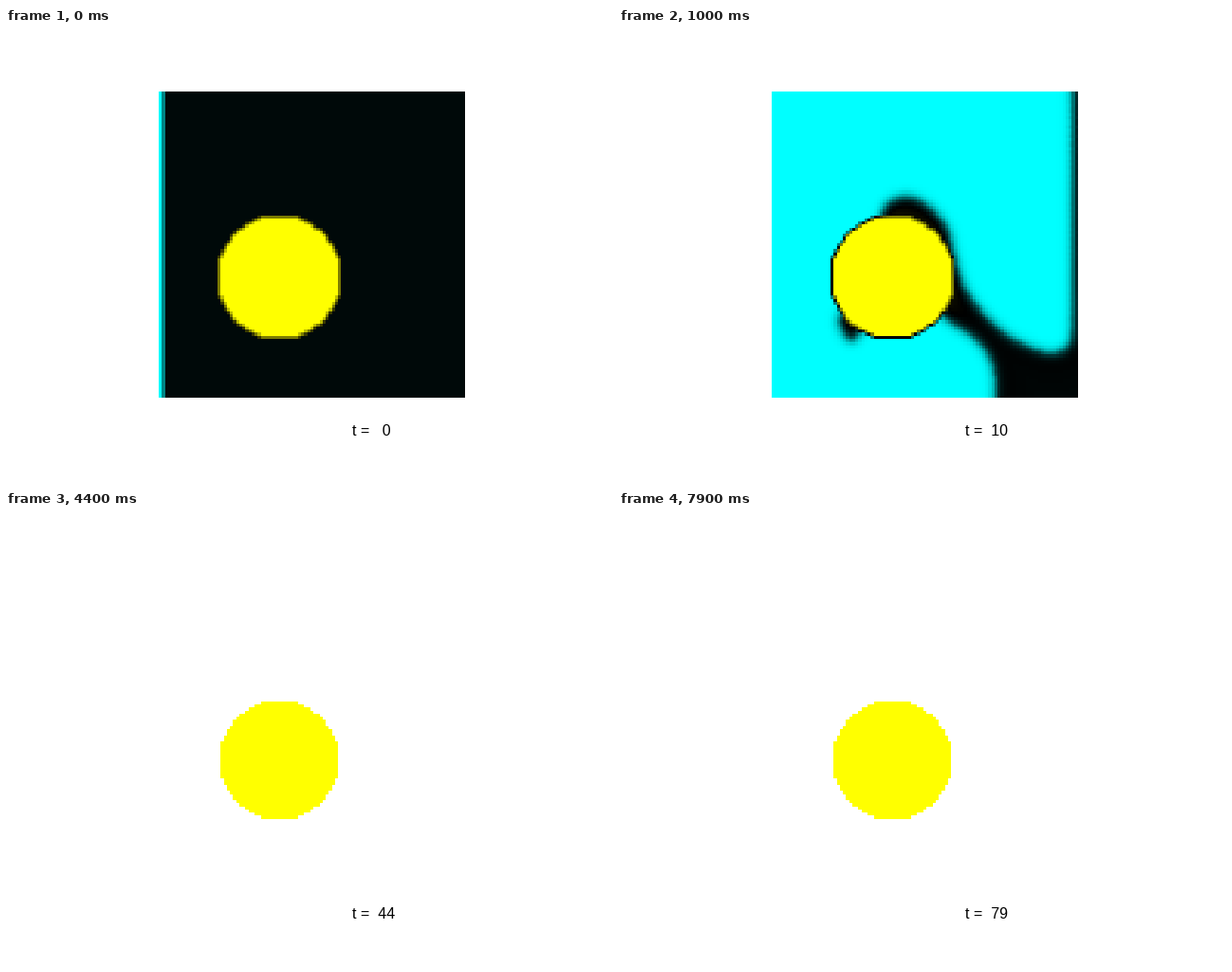
Write a matplotlib script that moves like this. It is 640 by 480 pixels and loops after 8 s.

```python
import numpy as np
import matplotlib.pyplot as plt
from matplotlib.animation import FuncAnimation
from matplotlib.colors import LinearSegmentedColormap
from matplotlib.path import Path

W, H, DPI = 640, 480, 100
LEFT, RIGHT, TOP, BOTTOM = 161, 484, 67, 390
N = 100
FRAMES, STEP = 80, 100
BLOWUP = 13          # from here on the field is undefined

# Grid nodes in stage pixels, row 0 at the bottom.
ix, iy = np.meshgrid(np.arange(N), np.arange(N))
cell = (RIGHT - LEFT) / (N - 1)
nodes = np.column_stack([(LEFT + ix * cell).ravel(),
                         (BOTTOM - iy * cell).ravel()])
disc_r = np.hypot(ix - 39, iy - 39)
solid = disc_r < 20
centre = np.array([LEFT + 39 * cell, BOTTOM - 39 * cell])

# Interface between the two fluids, from the top wall to the bottom wall.
y = np.linspace(40, 410, 27)
start = np.column_stack([np.full_like(y, 166), y])
early = np.column_stack([218 + 40 * np.exp(-((y - 146) / 62) ** 2)
                         + 14 * np.exp(-((y - 385) / 45) ** 2), y])
middle = np.array([
    (380, 40), (386, 68), (400, 90), (427, 108), (448, 130), (454, 158),
    (446, 190), (423, 212), (388, 221), (362, 214), (345, 206), (328, 197),
    (310, 191), (292, 186), (270, 186), (248, 191), (231, 207), (222, 235),
    (219, 265), (222, 297), (236, 321), (254, 329), (270, 333), (288, 341),
    (304, 358), (312, 382), (312, 410)], float)
late = np.array([
    (478, 40), (478, 72), (478, 140), (478, 200), (478, 260), (478, 305),
    (474, 333), (453, 342), (415, 327), (384, 300), (364, 272), (354, 240),
    (346, 211), (328, 189), (304, 178), (282, 187), (272, 215), (256, 255),
    (243, 286), (232, 310), (245, 329), (264, 314), (320, 293), (350, 311),
    (380, 333), (395, 362), (396, 410)], float)


def blend(a, b, k):
    return a + (b - a) * k


def spline(p, n=8):
    """Catmull-Rom curve through the points p."""
    p = np.vstack([2 * p[0] - p[1], p, 2 * p[-1] - p[-2]])
    a, b, c, d = (q[:, None] for q in (p[:-3], p[1:-2], p[2:-1], p[3:]))
    s = np.linspace(0, 1, n, endpoint=False)[None, :, None]
    curve = 0.5 * (2 * b + (c - a) * s + (2 * a - 5 * b + 4 * c - d) * s**2
                   + (3 * b - a - 3 * c + d) * s**3)
    return np.vstack([curve.reshape(-1, 2), p[-2]])


def interface(t):
    if t > 6:
        return spline(blend(middle, late, (t - 6) / 4))
    pts = blend(start, early, t / 3) if t <= 3 else blend(early, middle, (t - 3) / 3)
    # A thin film stays between the front and the disc.
    off = pts - centre
    r = np.hypot(*off.T)[:, None]
    return spline(centre + off * np.maximum(1, 69 / r))


def field(t):
    curve = interface(t)
    gap = nodes[:, None] - curve[None]
    dist = np.sqrt((gap ** 2).sum(axis=2).min(axis=1))
    dry = Path(np.vstack([curve, (700, 410), (700, 40)])).contains_points(nodes)
    width = 5.5 if t else 0.3
    wet = 0.5 + 0.5 * np.tanh(np.where(dry, -dist, dist) / width)
    floor = 0.036 if t == 0 else 0.036 * (1 - np.exp(-dist / 40))
    v = (floor + (1 - floor) * wet).reshape(N, N)
    if t > 6:
        v -= 0.02 * (t - 6) * np.exp(-(disc_r - 20) / 4) * (1 - wet.reshape(N, N))
    return v


def quads(t):
    v = field(t) if t < BLOWUP else np.full((N, N), np.nan)
    v = np.where(solid, -1.0, v)
    mean = (v[1:, 1:] + v[1:, :-1] + v[:-1, 1:] + v[:-1, :-1]) / 4
    return np.ma.masked_invalid(mean)


fig = plt.figure(figsize=(W / DPI, H / DPI), dpi=DPI, facecolor="white")
ax = fig.add_axes([0, 0, 1, 1])
palette = LinearSegmentedColormap.from_list("phase", ["yellow", "black", "cyan"], N=512)
palette.set_bad("white")
image = ax.imshow(quads(0), cmap=palette, vmin=-1, vmax=1, origin="lower",
                  extent=(LEFT, RIGHT, BOTTOM, TOP), interpolation="nearest")
ax.set(xlim=(0, W), ylim=(H, 0), aspect="auto")
ax.axis("off")
label = ax.text(364.8, 430, "", family="Liberation Sans", size=16 * 72 / DPI,
                color="black", va="baseline", ha="left")


def update(t):
    image.set_data(quads(t))
    label.set_text(f"t = {t:3d}")
    return image, label


anim = FuncAnimation(fig, update, frames=FRAMES, interval=STEP,
                     init_func=lambda: update(0), repeat=True, repeat_delay=0)
plt.show()
```
